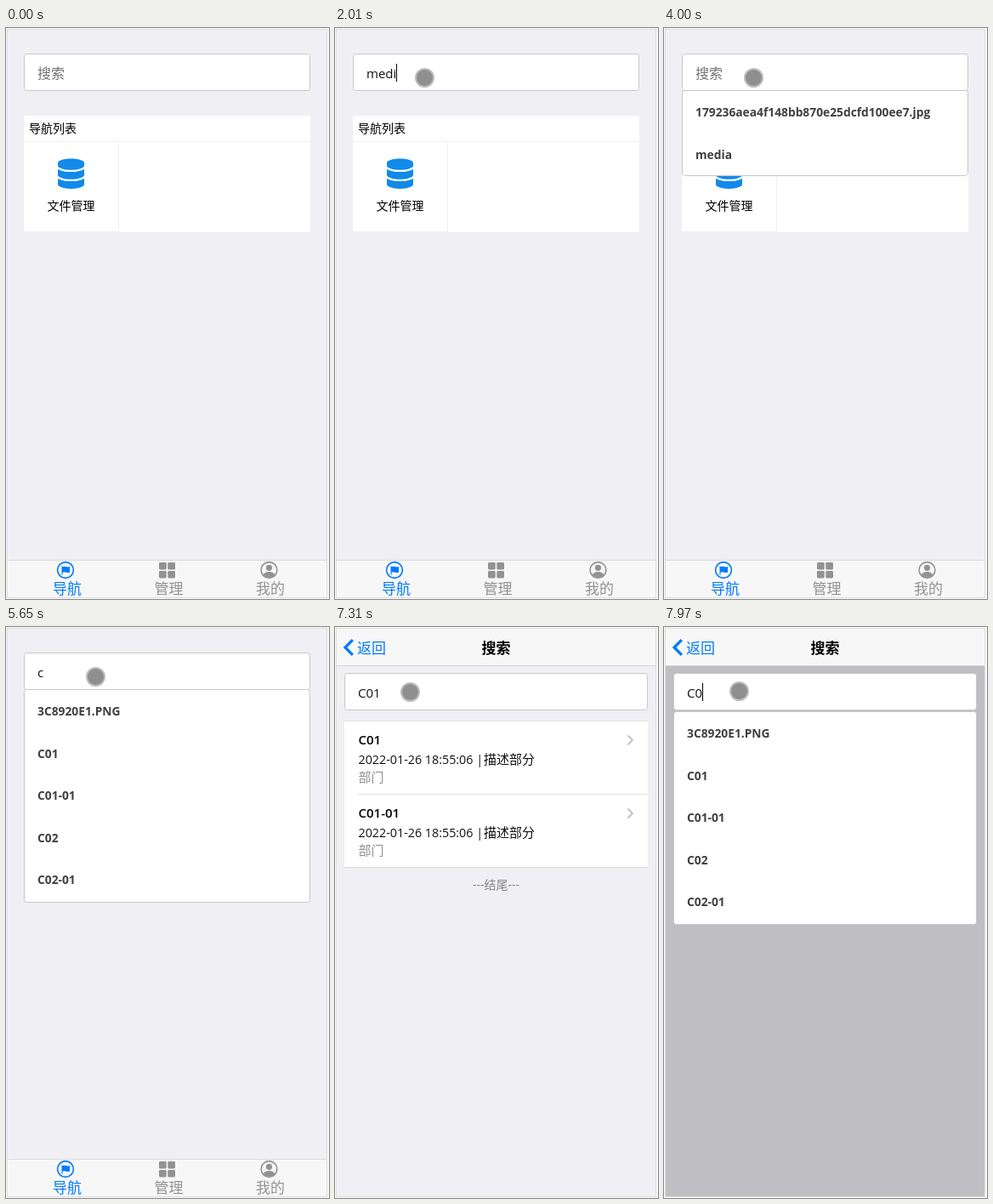
These frames come from a looping animation (380x671 px, 8000 ms). An HTML page:

```html
<!DOCTYPE html>
<html lang="zh">
<head>
<meta charset="utf-8">
<style>
html, body { margin: 0; height: 100%; overflow: hidden; background: #f8f8fa; }
svg { display: block; width: 380px; height: 671px; font-family: "Open Sans", "Noto Sans CJK SC", "Noto Sans CJK", sans-serif; }
</style>
</head>
<body>
<svg id="stage" viewBox="0 0 380 671"></svg>
<script>
const LOOP = 8000, BLUE = '#007aff', GRAY = '#929292', LINE = '#c8c8cc', INPUT_SIZE = 15;
const stage = document.getElementById('stage');
const ruler = document.createElement('canvas').getContext('2d');

const files = ['179236aea4f148bb870e25dcfd100ee7.jpg', 'media'];
const codes = ['3C8920E1.PNG', 'C01', 'C01-01', 'C02', 'C02-01'];

// Each step overrides parts of the state from its time on.
const steps = [
  [0, { cursor: null, text: '', caret: false, items: [], slide: 0 }],
  [330, { cursor: [134.5, 139.5] }],
  [660, { cursor: [106.5, 59.5] }],
  [990, { cursor: [105.5, 58.5], caret: true }],
  [1330, { caret: false }],
  [1660, { text: 'me', caret: true }],
  [2010, { text: 'medi' }],
  [2340, { text: 'media', items: files.slice(1) }],
  [2670, { caret: false }],
  [3000, { text: 'medi' }],
  [3340, { text: 'med', caret: true }],
  [3670, { text: 'm', caret: false }],
  [4000, { text: '', items: files }],
  [4330, { text: 'c', items: codes, caret: true }],
  [4990, { caret: false }],
  [5320, { caret: true }],
  [5650, { caret: false }],
  [5990, { cursor: [73.5, 131.5] }],
  [6320, { cursor: [66.5, 150.5], caret: true }],
  [6650, { slide: 0.832, active: 1, caret: false, query: 'C01', results: [] }],
  [6980, { slide: 1 }],
  [7310, { cursor: [88.5, 76.5] }],
  [7640, { results: codes, queryCaret: true }],
  [7970, { query: 'C0', cursor: [88.5, 75.5] }]
];

const rect = (x, y, w, h, fill, extra = '') =>
  `<rect x="${x}" y="${y}" width="${w}" height="${h}" fill="${fill}" ${extra}/>`;
const label = (x, y, size, str, fill = '#000', extra = '') =>
  `<text x="${x}" y="${y}" font-size="${size}" fill="${fill}" ${extra}>${str}</text>`;
const path = (d, fill, extra = '') => `<path d="${d}" fill="${fill}" ${extra}/>`;
const circle = (x, y, r, fill, extra = '') =>
  `<circle cx="${x}" cy="${y}" r="${r}" fill="${fill}" ${extra}/>`;
const group = (x, content) => `<g transform="translate(${x})">${content}</g>`;
const BOLD = 'font-weight="700"', SEMI = 'font-weight="600"', MIDDLE = 'text-anchor="middle"';

function textWidth(str) {
  ruler.font = `${INPUT_SIZE}px "Open Sans", sans-serif`;
  return ruler.measureText(str).width;
}

function searchBox({ x, y, w, gap, text, caret, items, active }) {
  const border = `rx="3" stroke="${LINE}"`;
  const top = y + 43 + gap;
  let out = '';
  if (items.length) {
    out += rect(x + .5, top + .5, w - 1, Math.round(items.length * 49.7 + 1), '#fff', border);
    items.forEach((item, i) => {
      if (i === active) out += rect(x + 1, top + 1 + i * 49.6, w - 2, 49.5, '#efefef');
      out += label(x + 16, top + 31 + i * 49.5, 13.8, item, '#404040', BOLD);
    });
  }
  out += rect(x + .5, y + .5, w - 1, 43, '#fff', border);
  out += text
    ? label(x + 16, y + 29, INPUT_SIZE, text, '#111')
    : label(x + 16, y + 29, 16, '搜索', '#757575');
  if (caret) out += rect(Math.round(x + 16 + textWidth(text)), y + 12, 1, 21, '#000');
  return out;
}

function databaseIcon() {
  const band = y => `M448 ${y}v102.9c0 40.2-100.3 73.1-224 73.1S0 ${y + 143.1} 0 ${y + 102.9}V${y}c48 33 136 48.6 224 48.6S400 ${y + 33} 448 ${y}z`;
  const disc = 'M448 73v46c0 40-100 73-224 73S0 159 0 119V73C0 33 100 0 224 0s224 33 224 73z';
  return path(disc + band(176) + band(336), '#118aea', 'transform="translate(61 153.5) scale(.0692)"');
}

function tabBar() {
  const ring = color => `stroke="${color}" stroke-width="1.6"`;
  const squares = [[180, 628], [190.3, 628], [180, 638], [190.3, 638]]
    .map(([x, y]) => rect(x, y, 8.7, 8.4, GRAY, 'rx="1.3"')).join('');
  return rect(2, 625, 375, 45, '#f7f7f8') + rect(2, 625, 375, 1, '#dcdce0') +
    circle(70, 637, 9.4, 'none', ring(BLUE)) +
    path('M65.5 632.5h1v.6q2.2-.8 4.3 0t4.2 0v6.6q-2.100.8-4.200 0t-4.300 0v3h-1z', BLUE) +
    squares +
    circle(309.5, 637, 9.4, 'none', ring(GRAY)) + circle(309.5, 634.3, 3.6, GRAY) +
    path('M302.800 642.500q1.500-3.500 6.700-3.500t6.700 3.500q-2.500 3.200-6.700 3.200t-6.700-3.200z', GRAY) +
    label(72, 665, 17, '导航', BLUE, MIDDLE) +
    label(191.5, 665, 17, '管理', GRAY, MIDDLE) +
    label(311, 665, 17, '我的', GRAY, MIDDLE);
}

function homePage(s) {
  return rect(2, 2, 375, 667, '#efeff4') +
    rect(21, 103, 337, 137, '#fff', 'rx="2"') +
    rect(21, 133, 337, 1, '#efeff2') + rect(132, 134, 1, 106, '#efeff2') + rect(21, 239, 112, 1, '#efeff2') +
    label(27, 123, 14, '导航列表') + databaseIcon() + label(76.5, 214, 14, '文件管理', '#000', MIDDLE) +
    searchBox({ x: 21, y: 30, w: 337, gap: 0, text: s.text, caret: s.caret, items: s.items, active: s.active }) +
    tabBar();
}

function resultRow(title, y) {
  return label(27.500, y + 27, 15, title, '#000', SEMI) +
    label(27.500, y + 50, 14.300, '2022-01-26 18:55:06 |', '#111') +
    label(175, y + 50, 15, '描述部分', '#111') +
    label(27.500, y + 71, 15, '部门', '#8f8f94') +
    path(`M344.500 ${y + 16.500}l5.500 5.500l-5.500 5.500`, 'none', 'stroke="#c0c0c4" stroke-width="1.800"');
}

function resultPage(s) {
  return rect(2, 2, 375, 667, '#efeff4') +
    rect(2, 2, 375, 43, '#f7f7f7') + rect(2, 45, 375, 1, '#d4d4d8') +
    path('M20.800 15.200l-8.800 8.800l8.800 8.800', 'none', `stroke="${BLUE}" stroke-width="3.300"`) +
    label(26, 31, 17, '返回', BLUE) + label(189.500, 31, 17, '搜索', '#000', BOLD + MIDDLE.padStart(MIDDLE.length + 1)) +
    rect(11, 111, 357, 172, '#fff') +
    rect(11, 110, 357, 1, '#e0e0e4') + rect(11, 282, 357, 1, '#dcdce0') + rect(27, 196, 341, 1, '#e3e3e6') +
    resultRow('C01', 111) + resultRow('C01-01', 197) +
    label(189.500, 308, 14, '---结尾---', '#85858a', MIDDLE) +
    (s.results.length ? rect(2, 46, 375, 623, '#000', 'opacity=".2"') : '') +
    searchBox({ x: 11, y: 54, w: 357, gap: 2, text: s.query, caret: s.queryCaret, items: s.results });
}

function statusBubble() {
  return path('M1 647.500h121q4 0 4 4v19h-125z', '#dee1e6', 'stroke="#c6cace"') +
    label(7, 663, 11.400, 'Waiting for api.sso...', '#4a4d52');
}

function picture(s) {
  const sliding = s.slide > 0 && s.slide < 1;
  let out = s.slide < 1 ? group(-75 * s.slide, homePage(s)) : '';
  if (s.slide) out += group(375 * (1 - s.slide), resultPage(s));
  if (sliding) out += statusBubble();
  if (s.cursor) out += circle(...s.cursor, 10.500, '#8f8f8f', 'stroke="#bdbdbf" stroke-width="2"');
  return `<clipPath id="screen">${rect(2, 2, 375, 667, '#000')}</clipPath>` +
    `<g clip-path="url(#screen)">${out}</g>` +
    rect(1.500, 1.500, 376, 668, 'none', 'stroke="#dedee2"');
}

let shown = -1;
function frame() {
  const t = performance.now() % LOOP;
  const past = steps.filter(([time]) => time <= t);
  if (past.length !== shown) {
    shown = past.length;
    stage.innerHTML = picture(Object.assign({}, ...past.map(([, change]) => change)));
  }
  requestAnimationFrame(frame);
}
frame();
</script>
</body>
</html>
```
